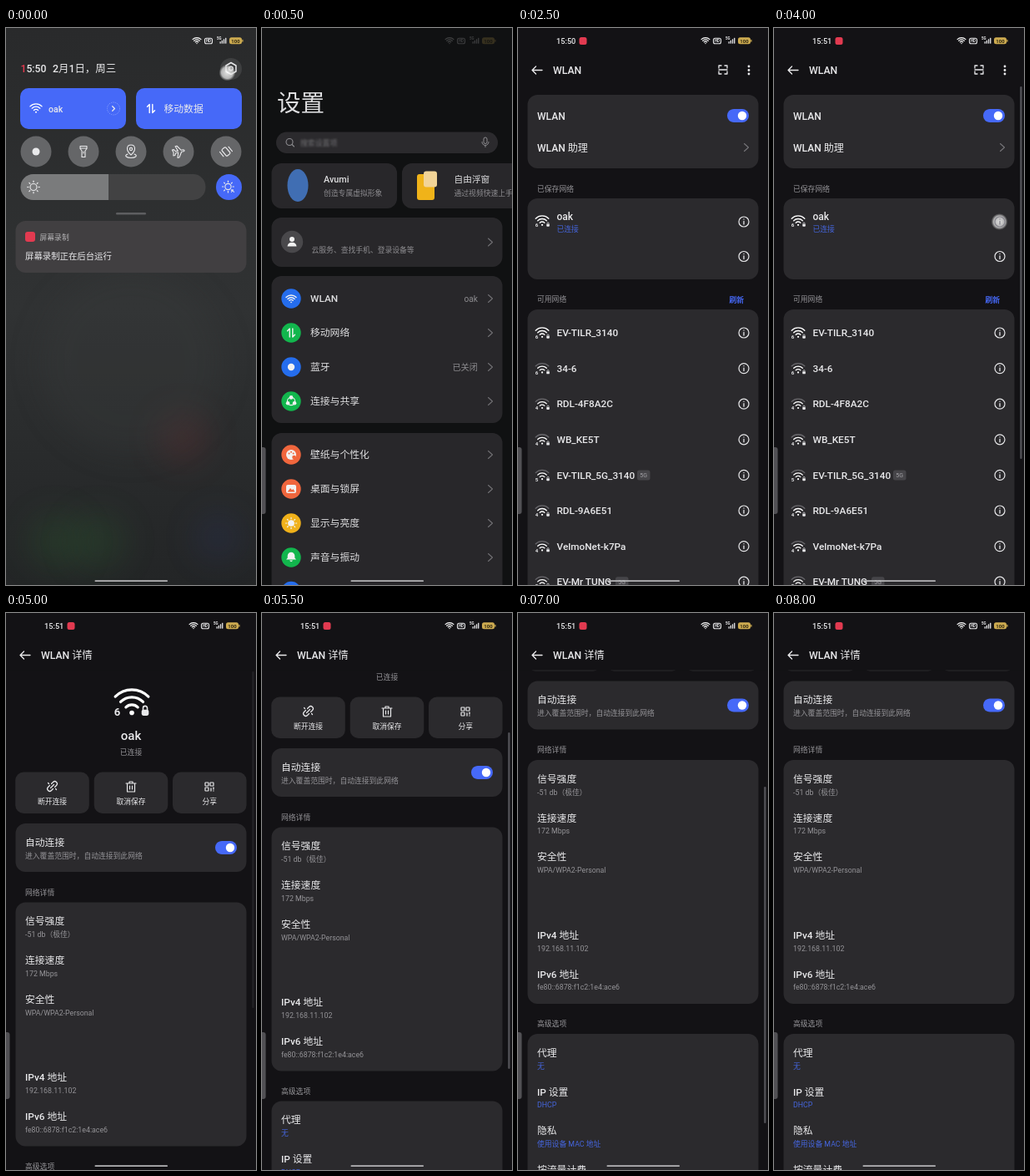
An HTML page for the animation above (8.5 s loop, 300 by 667 pixels).

```html
<!DOCTYPE html>
<html lang="zh">
<head>
<meta charset="utf-8">
<title>WLAN 设置</title>
<style>
html, body { margin: 0; width: 100%; height: 100%; overflow: hidden; background: #131215; }
svg { display: block; width: 100vw; height: 100vh; }
text { font-family: Roboto, "Noto Sans CJK SC", "Noto Sans CJK", sans-serif; white-space: pre; }
.line { fill: none; stroke-linecap: round; stroke-linejoin: round; }
</style>
</head>
<body>
<svg id="stage" viewBox="0 0 300 667"></svg>
<script>
const WHITE = '#e9e9eb', GREY = '#949397', CARD = '#2b2a2d', BG = '#131215';
const BLUE = '#4669f8', LINK = '#4565dc', RED = '#e23a50';
const ICON = { blue: '#2873fa', green: '#14c052', orange: '#fd6c41', yellow: '#fdbb1c' };
const NET = 'oak';

// Shape helpers; text is placed by its vertical centre, titles are medium weight.
const text = (s, x, y, size = 11.8, fill = WHITE, anchor = 'start', weight = size < 10 ? 400 : 500) =>
  `<text x="${x}" y="${y + size * .36}" font-size="${size}" fill="${fill}" text-anchor="${anchor}" font-weight="${weight}">${s}</text>`;
const note = (s, x, y, fill = GREY, anchor) => text(s, x, y, 8.8, fill, anchor);
const rect = (x, y, w, h, r, fill, extra = '') =>
  `<rect x="${x}" y="${y}" width="${w}" height="${h}" rx="${r}" fill="${fill}" ${extra}/>`;
const card = (y, h, x = 11.5, w = 277) => rect(x, y, w, h, 12, CARD);
const disc = (x, y, r, fill, extra = '') => `<circle cx="${x}" cy="${y}" r="${r}" fill="${fill}" ${extra}/>`;
const ring = (x, y, r, w = 1.2, stroke = WHITE, extra = '') =>
  disc(x, y, r, 'none', `stroke="${stroke}" stroke-width="${w}" ${extra}`);
const line = (d, x, y, w = 1.2, stroke = WHITE, turn = 0) =>
  `<path class="line" d="${d}" transform="translate(${x} ${y}) rotate(${turn})" stroke="${stroke}" stroke-width="${w}"/>`;
const solid = (d, x, y, fill = '#fff') => `<path d="${d}" transform="translate(${x} ${y})" fill="${fill}"/>`;
const group = (body, attrs) => `<g ${attrs}>${body}</g>`;

const chevron = y => line('M-2.5 -4.5L2.5 0L-2.5 4.5', 274, y, 1.1, '#77767a');
const touch = (x, y) => disc(x, y, 10, 'url(#touch)');
const sun = (x, y, r, color = WHITE, fill = 'none') =>
  disc(x, y, r, fill, `stroke="${color}" stroke-width="1.1"`) +
  [...Array(8)].map((_, i) => line(`M0 ${-r - 2}v-1.3`, x, y, 1.2, color, i * 45)).join('');
const arrows = (x, y) => line('M-1.8 5V-5L-4.5 -2.3M1.8 -5V5L4.5 2.3', x, y, 1.4, '#fff');
const lock = (x, y, k) => group(rect(-2.4, -1, 4.8, 4, 1.2, WHITE) + line('M-1.4 -1v-1a1.4 1.4 0 0 1 2.8 0v1', 0, 0, .9),
  `transform="translate(${x} ${y}) scale(${k})"`);

// Fan of three arcs above a dot at (x, y).
function wifi(x, y, r, w, lit = 3) {
  const arc = (k, i) => {
    const q = r * k, c = q * .71;
    return line(`M${-c} ${-c}A${q} ${q} 0 0 1 ${c} ${-c}`, x, y, w, i < lit ? '#fff' : '#68676b');
  };
  return [.36, .68, 1].map(arc).join('') + disc(x, y - r * .02, r * .1, '#fff');
}
const netIcon = (y, gen, lit) => wifi(29, y + 5, 11, 1.3, lit) + text(gen, 22.5, y + 5, 6, WHITE, 'middle', 700) + lock(36, y + 4.5, .75);
const info = (y, color = WHITE) => ring(271, y, 6, 1.2, color) + line('M0 -.5V3M0 -3v.1', 271, y, 1.3, color);
const toggle = y => rect(251, y - 8, 26, 16, 8, BLUE) + disc(269, y, 5.2, '#fff');

function statusBar(clock, dx = 0) {
  const bars = [2.5, 4, 5.5, 7].map((h, i) => rect(252.5 + i * 2.2, 18.7 - h, 1.3, h, .4, WHITE)).join('');
  const icons = wifi(225, 18.7, 7, 1.1) +
    rect(234.5, 12.2, 9, 6.5, 2, 'none', `stroke="${WHITE}" stroke-width="1.1"`) + text('HD', 239, 15.5, 4.5, WHITE, 'middle', 700) +
    text('5G', 249, 12.5, 4.5, WHITE, 'start', 700) + bars +
    rect(264, 11.3, 15, 8, 2.5, '#cdab50') + rect(279.3, 13.8, 1.2, 3, .6, '#cdab50') +
    text('100', 271.5, 15.4, 6, '#2a2310', 'middle', 700);
  const left = clock ? text(clock, 46, 15.3, 9.2, WHITE, 'start', 500) + rect(73.5, 11, 9, 9, 2.5, RED) : '';
  return left + group(icons, `transform="translate(${dx} 0)"`);
}
const homeBar = rect(106.5, 661.3, 87.5, 1.7, .8, '#b4b4b6');
const edgeHandle = rect(-4, 502, 8.5, 80, 3, '#515054');

function shade() {
  const dial = x => disc(x, 148, 18.5, '#656668');
  const glow = [[212, 490, 32, '#6a2f30'], [60, 615, 35, '#2c542f'], [110, 615, 35, '#2c542f'], [255, 610, 30, '#2b3158'], [150, 400, 110, '#3a3c3d']]
    .map(([x, y, r, c]) => disc(x, y, r, c, 'filter="url(#soft)" opacity=".3"')).join('');
  return rect(0, 0, 300, 667, 0, 'url(#shade)') + glow + statusBar('', 4) +
    text('<tspan fill="#e5394f">1</tspan>5:50', 17.5, 49, 12.2) + text('2月1日，周三', 56, 49, 12.4) +
    disc(270, 49, 13, '#3e3f40') + line('M0 -7L6 -3.5V3.5L0 7L-6 3.5V-3.5Z', 270, 48.5, 1.5) + ring(270, 48.5, 2.3, 1.3) + touch(265.5, 53.5) +
    rect(17, 72, 127, 49, 10, BLUE) + rect(156, 72, 127, 49, 10, BLUE) +
    wifi(36, 101, 10, 1.3) + text(NET, 51, 97, 10.5) +
    ring(129, 96.5, 7.5, 1, '#8fa5ff', 'stroke-dasharray="1 1.3"') + line('M-1.3 -2.7L1.4 0L-1.3 2.7', 129, 96.5, 1.3) +
    arrows(174, 96.5) + text('移动数据', 189.5, 97, 11.8) +
    [36, 93, 150, 207, 264].map(dial).join('') + disc(36, 148, 4.5, WHITE) +
    line('M-4 -6.5H4V-3.5L2 -1V6.5H-2V-1L-4 -3.5ZM-4 -4H4M0 0V2', 93, 148, 1.1) +
    line('M0 4C-7 -2 -5 -8 0 -8S7 -2 0 4ZM-4 3C-9 5 -5 7.5 0 7.5S9 5 4 3', 150, 148, 1.1) + ring(150, 145, 1.6, 1.1) +
    line('M-7 -3.5H-5L-3.5 -1H-.5L-2.5 -7H-.5L3.5 -1H6Q8.5 0 6 1H3.5L-.5 7H-2.5L-.5 1H-3.5L-5 3.5H-7L-6 0Z', 207, 148, 1.1, WHITE, -12) +
    group(rect(-3, -5, 6, 10, 1.5, 'none', `stroke="${WHITE}" stroke-width="1.2"`) +
      line('M-6 -4.5V2.5M6 4.5V-2.5', 0, 0, 1.1), 'transform="translate(264 148) rotate(-40)"') +
    rect(17.5, 175, 222, 31, 15, '#424243') + solid('M0 0H90V31H0A15.5 15.5 0 0 1 0 0Z', 33, 175, '#7a7b7c') +
    sun(33, 190.5, 4) + disc(267.5, 190.5, 15.5, BLUE) + sun(266.5, 190, 3.6) + text('A', 270, 195, 6, WHITE, 'start', 700) +
    rect(132, 221, 36, 2.6, 1.3, '#5d5e60') +
    rect(11.5, 231, 277, 62, 12, '#413f41') + rect(23, 244, 12, 12, 3, RED) +
    note('屏幕录制', 40.5, 250.5, '#b5b4b6') + text('屏幕录制正在后台运行', 23, 273.5, 10.4) + homeBar;
}

function settings(pressed, opening) {
  const row = (y, label, color, glyph, value = '') => disc(35, y, 11.7, color) + glyph +
    text(label, 58, y) + text(value, 259, y, 10.2, GREY, 'end', 400) + chevron(y);
  const hub = [-90, 30, 150].map(a => {
    const t = a * Math.PI / 180;
    return disc(35 + 4.6 * Math.cos(t), 447 + 4.6 * Math.sin(t), 2.3, '#fff');
  }).join('');
  const palette = disc(35, 511, 6, '#fff') + [[-2.5, -1.5], [0, -3.2], [2.6, -1.5]].map(([x, y]) => disc(35 + x, 511 + y, 1, ICON.orange)).join('') +
    disc(38.5, 514, 2.3, ICON.orange);
  const picture = rect(29, 547, 12, 10, 2, '#fff') + solid('M-4.5 3.5L-1 -1L1 1.2L2.5 0L4.5 3.5Z', 35, 552, ICON.orange);
  const bell = solid('M-6 3L-4.3 1V-1.5A4.3 4.3 0 0 1 4.3 -1.5V1L6 3ZM-2 4H2Q0 7 -2 4Z', 35, 633.5);
  const hint = text('搜索设置项', 46, 137.3, 8.9, '#77767a');
  const body = text('设置', 18, 89.5, 28.5) +
    rect(17, 124.5, 266, 25.5, 12.7, '#2e2d30') +
    ring(33, 136.5, 4, 1.1, GREY) + line('M0 0L2.5 2.5', 36, 139.5, 1.1, GREY) +
    (opening ? group(hint, 'filter="url(#haze)"') : hint) +
    rect(266, 131, 4, 7.5, 2, 'none', `stroke="${GREY}"`) + line('M-4 -2A4 4 0 0 0 4 -2M0 2V4', 268, 138.5, 1, GREY) +
    card(162, 54, 11.5, 150.5) + card(162, 54, 168, 160) +
    '<ellipse cx="43" cy="188.5" rx="12.5" ry="19.5" fill="#4474bd"/>' +
    text('Avumi', 74, 181.5, 10.8) + note('创造专属虚拟形象', 74, 197.5) +
    rect(186, 175, 21, 31, 3, '#fdbd1b') + rect(194, 171.5, 16, 19, 3, '#ffe0a0') +
    text('自由浮窗', 230.5, 181.5, 10.7) + note('通过视频快速上手', 230.5, 197.5) +
    card(227, 59) + disc(36, 256, 13.2, '#4d4c50') + disc(36, 253, 3, '#fff') + solid('M-5.5 5.5Q-5 .8 0 .8T5.5 5.5Z', 36, 256) +
    note('云服务、查找手机、登录设备等', 59.5, 266) + chevron(256.5) +
    card(297, 176) + (pressed ? solid('M0 47V12A12 12 0 0 1 12 0H265A12 12 0 0 1 277 12V47Z', 11.5, 297, '#454448') : '') +
    row(324, 'WLAN', ICON.blue, wifi(35, 328.5, 8.5, 1.4), NET) +
    row(365, '移动网络', ICON.green, arrows(35, 365)) +
    row(406, '蓝牙', ICON.blue, disc(35, 406, 4.2, '#fff'), '已关闭') +
    row(447, '连接与共享', ICON.green, ring(35, 447, 4.6, 1.1, '#fff') + hub) +
    card(485, 200) +
    row(511, '壁纸与个性化', ICON.orange, palette) +
    row(552, '桌面与锁屏', ICON.orange, picture) +
    row(593, '显示与亮度', ICON.yellow, sun(35, 593, 3.3, '#fff', '#fff')) +
    row(634, '声音与振动', ICON.green, bell) +
    disc(35, 674.5, 11.7, ICON.blue) + (pressed ? touch(70, 326) : '');
  return rect(0, 0, 300, 667, 0, opening ? '#101112' : BG) +
    (opening ? group(body, 'opacity=".95" filter="url(#blur)"') + group(statusBar(''), 'opacity=".2"')
      : body + statusBar('15:50')) + edgeHandle + homeBar;
}

const header = title => line('M6 0H-6L-1.5 -4.5M-6 0L-1.5 4.5', 23, 50.5, 1.3) + text(title, 42, 50.5, 12.2);
const scrollBar = (y, h, opacity) => rect(295.3, y, 2.2, h, 1.1, '#55545a', `opacity="${opacity}"`);

function wlan(clock, bar, touched) {
  const nets = [['EV-TILR_3140', 6, 3], ['34-6', 6, 2], ['RDL-4F8A2C', 4, 2], ['WB_KE5T', 4, 2],
    ['EV-TILR_5G_3140', 5, 2, 143], ['RDL-9A6E51', 4, 2], ['VelmoNet-k7Pa', 4, 2], ['EV-Mr TUNG', 5, 2, 117]];
  const badge = (x, y) => rect(x, y - 6, 15.5, 12, 2.5, '#464549') + text('5G', x + 7.7, y, 7, '#a2a1a5', 'middle');
  const list = nets.map(([name, gen, lit, badgeX], i) => {
    const y = 365 + i * 42.6;
    return netIcon(y, gen, lit) + text(name, 46.5, y) + info(y) + (badgeX ? badge(badgeX, y) : '');
  }).join('');
  return rect(0, 0, 300, 667, 0, BG) + statusBar(clock) + header('WLAN') +
    line('M-5 -2V-5H-2M2 -5H5V-2M5 2V5H2M-2 5H-5V2M-5 0H5', 246, 50, 1.3) +
    [-4.5, 0, 4.5].map(d => disc(277, 50.5 + d, 1.4, WHITE)).join('') +
    card(80, 88) + text('WLAN', 23, 106, 12) + toggle(105) + text('WLAN 助理', 23, 144, 12) + chevron(143) +
    note('已保存网络', 23, 192.5) + card(204, 97) +
    netIcon(231, 6, 3) + text(NET, 46.5, 225.5, 12) + note('已连接', 46.5, 240.5, LINK) +
    (touched ? touch(270.5, 232) + info(232, '#85848c') : info(232)) + info(273.5) +
    note('可用网络', 23, 325) + text('刷新', 271, 325.5, 8.8, BLUE, 'end', 700) +
    card(337, 350) + list + (bar ? scrollBar(70, 446, 1) : '') + edgeHandle + homeBar;
}

function detail(scroll, barOpacity) {
  const item = (y, title, sub, fill) => text(title, 23, y) + note(sub, 23, y + 16, fill);
  const button = (x, label, icon) => rect(x - 44.3, 190.5, 88.6, 49.5, 10, CARD) + icon + note(label, x, 226, WHITE, 'middle');
  const unlink = line('M-1 -3L1 -5A2.8 2.8 0 0 1 5 -1L3 1M1 3L-1 5A2.8 2.8 0 0 1 -5 1L-3 -1M-2 2L2 -2M-5 -4L-4 -3M5 4L4 3', 55.5, 207.5, 1.2);
  const bin = line('M-6 -4H6M-2 -4V-6H2V-4M-4.5 -4V6H4.5V-4M-1.5 -1V3M1.5 -1V3', 150, 208, 1.2);
  const tiles = [[-5, -5], [1, -5], [-5, 1]].map(([x, y]) =>
    rect(244 + x, 208 + y, 4, 4, .5, 'none', `stroke="${WHITE}" stroke-width="1.2"`)).join('') + line('M2 2V5M5 1V3M5 5V5.1', 244, 208, 1.3);
  const body = wifi(151, 120, 28, 3.2) + text('6', 133.5, 118, 13, WHITE, 'middle', 700) + lock(167, 117.5, 1.8) +
    text(NET, 150, 147, 15, WHITE, 'middle') + note('已连接', 150, 167, GREY, 'middle') +
    button(55.5, '断开连接', unlink) + button(150, '取消保存', bin) + button(244.3, '分享', tiles) +
    card(252, 58) + item(274.5, '自动连接', '进入覆盖范围时，自动连接到此网络') + toggle(281) +
    note('网络详情', 23, 334.5) + card(346.5, 292) +
    item(369, '信号强度', '-51 db（极佳）') + item(415.8, '连接速度', '172 Mbps') + item(462.6, '安全性', 'WPA/WPA2-Personal') +
    item(556, 'IPv4 地址', '192.168.11.102') + item(602.8, 'IPv6 地址', 'fe80::6878:f1c2:1e4:ace6') +
    note('高级选项', 23, 662.5) + card(674.5, 300) +
    item(697, '代理', '无', LINK) + item(743.8, 'IP 设置', 'DHCP', LINK) + item(790.6, '隐私', '使用设备 MAC 地址', LINK) +
    text('按流量计费', 23, 837.4);
  return rect(0, 0, 300, 667, 0, BG) + group(body, `transform="translate(0 ${-scroll})"`) +
    rect(0, 0, 300, 68.5, 0, BG) + statusBar('15:51') + header('WLAN 详情') +
    scrollBar(70 + scroll * .81, 403, barOpacity) + edgeHandle + homeBar;
}

const DEFS = `<defs>
<linearGradient id="shade" x2="0" y2="1"><stop stop-color="#292a2b"/><stop offset=".5" stop-color="#303233"/><stop offset="1" stop-color="#232526"/></linearGradient>
<radialGradient id="touch"><stop stop-color="#fff" stop-opacity=".85"/><stop offset=".7" stop-color="#ddd" stop-opacity=".75"/><stop offset="1" stop-color="#bbb" stop-opacity="0"/></radialGradient>
<filter id="soft" x="-1" y="-1" width="3" height="3"><feGaussianBlur stdDeviation="18"/></filter>
<filter id="blur"><feGaussianBlur stdDeviation=".45"/></filter>
<filter id="haze"><feGaussianBlur stdDeviation="1.3"/></filter>
</defs>`;

const STEP = 500, STEPS = 17, DETAIL_AT = 9;
const scrolls = [0, 0, 90, 157.5, 166, 170.5, 170.5, 170.5];
const barOpacities = [1, .25, 1, 1, 1, 1, 1, 0];

function scene(step) {
  if (step === 0) return shade();
  if (step < 5) return settings(step === 4, step === 1);
  if (step < DETAIL_AT) return wlan(step < 6 ? '15:50' : '15:51', step > 5, step === 8);
  return detail(scrolls[step - DETAIL_AT], barOpacities[step - DETAIL_AT]);
}

const stage = document.getElementById('stage');
const start = performance.now();
let shown = -1;
function tick() {
  const step = Math.floor((performance.now() - start) / STEP) % STEPS;
  if (step !== shown) stage.innerHTML = DEFS + scene(shown = step);
  requestAnimationFrame(tick);
}
tick();
</script>
</body>
</html>
```
